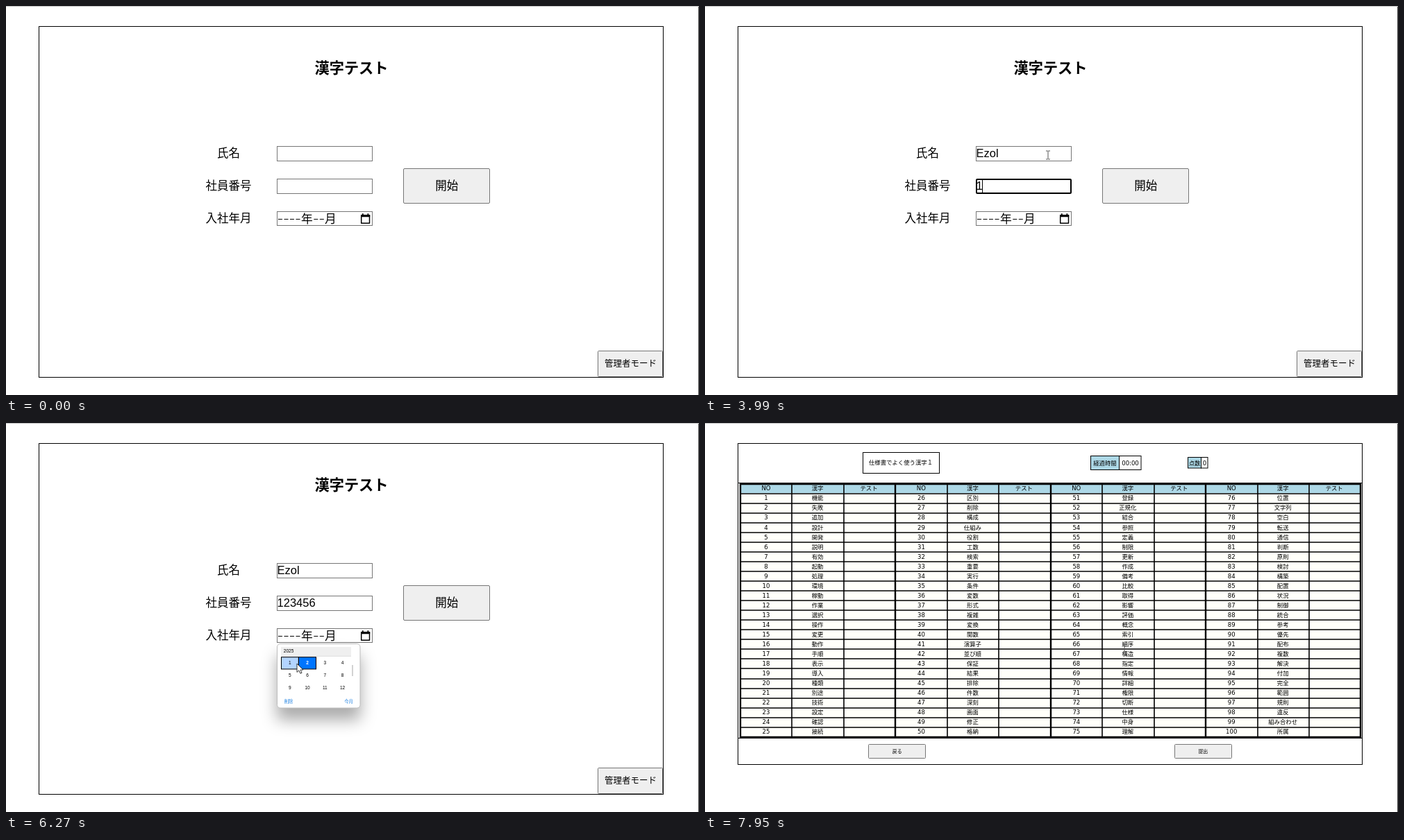
An HTML page for the animation above (8 s loop, 998 px wide and 561 px high).

```html
<!DOCTYPE html>
<html lang="ja">
<head>
<meta charset="utf-8">
<title>漢字テスト</title>
<style>
html, body { margin: 0; width: 100%; height: 100%; overflow: hidden; background: #fff; }
svg { display: block; width: 998px; height: 561px; font: 16.5px "Noto Sans CJK JP", "Noto Sans CJK", sans-serif; }
.mid { text-anchor: middle; }
.typed { font-family: "Liberation Sans", Arial, sans-serif; }
.half { font: 16.8px "Noto Sans Mono CJK JP", "Noto Sans Mono", monospace; }
.num { font: 8.5px "DejaVu Sans", sans-serif; }
.small { font-size: 8.4px; }
.tiny { font: 6.5px "Liberation Sans", Arial, sans-serif; }
.line { fill: none; stroke: #000; }
.field { fill: #fff; stroke: #767676; }
.field.on { stroke: #000; stroke-width: 2; }
.button { fill: #efefef; stroke: #767676; }
.button.hover { fill: #e5e5e5; stroke: #4f4f4f; }
.head { fill: #add8e6; stroke: #000; }
.link { font-size: 6.3px; fill: #1a7fe0; }
#panel { filter: drop-shadow(0 17px 11px rgba(0, 0, 0, .33)); }
</style>
</head>
<body>
<svg viewBox="0 0 998 561">
  <path d="M0 .5H998" stroke="#c4c4c4"/>
  <path d="M997.5 1V561" stroke="#444"/>

  <g id="form">
    <rect class="line" x="47.5" y="29.5" width="899" height="506"/>
    <text class="mid" x="497.5" y="96.5" font-size="21.2" font-weight="700">漢字テスト</text>
    <g class="mid">
      <text x="320.5" y="218">氏名</text>
      <text x="320.5" y="265">社員番号</text>
      <text x="320.5" y="312">入社年月</text>
    </g>
    <rect class="field" id="nameBox"/>
    <rect class="field" id="codeBox"/>
    <rect class="field" x="390.5" y="296.5" width="137" height="20"/>
    <text class="typed" id="name" x="390.6" y="218.3"></text>
    <text class="typed" id="code" x="390.6" y="265.3"></text>
    <rect id="caret" width="1" height="18"/>
    <g class="half">
      <text x="425" y="313">年</text>
      <text x="459" y="313">月</text>
      <path id="blank" class="line" stroke-width="1.1" stroke-dasharray="6 2.5" d="M392 307.5h32M443.3 307.5h15"/>
      <g id="date"><text x="391" y="313">2025</text><text x="442" y="313">02</text></g>
    </g>
    <path d="M511.7 301.7h11.8v11.6h-11.8z" class="line" stroke-width="1.5" stroke-linejoin="round"/>
    <path d="M511 301h13.2v3.2h-13.2zM513 299.2h1.7v2.5h-1.7zM520.5 299.2h1.7v2.5h-1.7z"/>
    <rect class="button" id="start" x="572.5" y="234.5" width="124" height="50" rx="1.5"/>
    <text class="mid" x="634.7" y="265">開始</text>
    <rect class="button" x="852.5" y="497.5" width="93" height="37" rx="1"/>
    <text class="mid" x="899.5" y="520" font-size="12.5">管理者モード</text>
  </g>

  <g id="popup">
    <rect id="panel" x="390.5" y="318.5" width="119.5" height="92.5" rx="4.5" fill="#fff" stroke="#bdbdbd"/>
    <rect x="396" y="323" width="101" height="13" fill="#efefef"/>
    <path d="M396 336.3H497" stroke="#d5d5d5" stroke-width=".8"/>
    <text class="tiny" x="399.8" y="331.3">2025</text>
    <rect id="jan" x="396.5" y="337.7" width="24.8" height="17.2" fill="#b3d4ff" stroke="#000"/>
    <rect x="421.5" y="337.7" width="25" height="17.2" fill="#0075ff" stroke="#000"/>
    <g class="tiny mid" id="months"></g>
    <path d="M499 349V365" stroke="#c1c1c1" stroke-width="1.4"/>
    <text class="link" x="400.8" y="404.3">削除</text>
    <text class="link" x="487.2" y="404.3">今月</text>
  </g>

  <g id="sheet">
    <rect class="line" x="47.5" y="29.5" width="899" height="463"/>
    <path class="line" d="M47 86.5H947M47 454.5H947"/>
    <rect class="line" x="227.5" y="42.5" width="110" height="30"/>
    <text class="small mid" x="282" y="60.3">仕様書でよく使う漢字１</text>
    <rect class="head" x="555.5" y="47.5" width="41" height="20"/>
    <rect class="line" x="596.5" y="47.5" width="31.5" height="20"/>
    <text class="small mid" x="576" y="60.5">経過時間</text>
    <text class="num mid" x="612.5" y="60.5">00:00</text>
    <rect class="head" x="695.5" y="49.5" width="19" height="15.5"/>
    <rect class="line" x="714.5" y="49.5" width="9.5" height="15.5"/>
    <text class="small mid" x="705" y="60.5">点数</text>
    <text class="num mid" x="719.5" y="60.5">0</text>
    <g id="table"></g>
    <rect class="button" x="235.5" y="463.5" width="82" height="20" rx="1"/>
    <rect class="button" x="676.5" y="463.5" width="82" height="20" rx="1"/>
    <g class="mid" font-size="6.9">
      <text x="276.7" y="475.8">戻る</text>
      <text x="717.3" y="475.8">提出</text>
    </g>
  </g>

  <g id="pointer">
    <circle id="press" cx="-1" cy="1" r="9" fill="#ff0" fill-opacity=".55"/>
    <path id="arrow" d="M0 0V12.4L2.9 9.8L4.9 14.2L7 13.3L5.1 9H9Z" fill="#fff" stroke="#222" stroke-width=".9"/>
    <path id="beam" d="M-3-6H-.7L0-5.4L.7-6H3M0-5.4V5.4M-3 6H-.7L0 5.4L.7 6H3" fill="none" stroke="#555"/>
  </g>
</svg>
<script>
const $ = id => document.getElementById(id);
const show = (id, on) => { $(id).style.display = on ? '' : 'none'; };

const words = `機能 失敗 追加 設計 開発 説明 有効 起動 処理 環境 稼動 作業 選択 操作 変更 動作 手順 表示 導入 種類 別途 技術 設定 確認 接続
区別 削除 構成 仕組み 役割 工数 検索 重要 実行 条件 変数 形式 複雑 変換 関数 演算子 並び順 保証 結果 排除 件数 深刻 画面 修正 格納
登録 正規化 結合 参照 定義 制限 更新 作成 備考 比較 取得 影響 評価 概念 索引 順序 構造 指定 情報 詳細 権限 切断 仕様 中身 理解
位置 文字列 空白 転送 通信 判断 原則 検討 構築 配置 状況 制御 統合 参考 優先 配布 複数 解決 付加 完全 範囲 規則 違反 組み合わせ 所属`.split(/\s+/);

const label = (cls, x, y, s) => `<text class="${cls} mid" x="${x}" y="${y}">${s}</text>`;

function buildTable() {
  const block = 223.4, col = 74.4, row = 14.04, top = 101.75;
  let out = '<path fill="#fffffa" d="M50 88H944V453H50z"/><path fill="#add8e6" d="M50 88H944V101H50z"/>';
  let thin = '', thick = 'M50 88H944.5M50 453H944.5';
  for (let r = 0; r < 25; r++) thin += `M50 ${Math.round(top + r * row)}H944`;
  for (let b = 0; b < 4; b++) {
    const x = 51 + b * block;
    thick += `M${Math.round(x)} 87V454`;
    thin += `M${Math.round(x + col)} 88V453M${Math.round(x + 2 * col)} 88V453`;
    out += label('num', x + 37, 97.3, 'NO') + label('small', x + 111, 97.3, '漢字') + label('small', x + 185, 97.3, 'テスト');
    for (let r = 0; r < 25; r++) {
      const n = b * 25 + r, y = 111.4 + r * row;
      out += label('num', x + 37, y, n + 1) + label('small', x + 111, y, words[n]);
    }
  }
  thick += 'M944 87V454';
  $('table').innerHTML = out +
    `<path class="line" stroke-width="1.6" d="${thin}"/><path class="line" stroke-width="2.4" d="${thick}"/>`;
}

function buildMonths() {
  let out = '';
  for (let m = 0; m < 12; m++) {
    const now = m === 1 ? ' fill="#fff" font-weight="700"' : '';
    out += `<text x="${408.7 + m % 4 * 25.3}" y="${348.2 + (m >> 2) * 18}"${now}>${m + 1}</text>`;
  }
  $('months').innerHTML = out;
}

// start, end, steps, from x, y, to x, y
const moves = [
  [450, 860, 7, 959, 548, 452, 174],
  [1080, 1270, 4, 460, 181, 494, 215],
  [4990, 5450, 8, 495, 219, 521, 306],
  [5650, 5720, 2, 515, 322, 496, 336],
  [5790, 6120, 6, 482, 345, 428, 362],
  [6190, 6270, 2, 424, 355, 419, 347],
  [6350, 6540, 4, 421, 348, 432, 351],
  [6930, 7420, 8, 445, 347, 659, 252],
  [7620, 7690, 2, 622, 290, 592, 316],
  [7750, 7950, 3, 588, 332, 604, 325]
];
const presses = [[1270, 1400], [5520, 5650], [7490, 7620]];
const keys = {
  name: ['Ezol', [2060, 2740, 2920, 3080]],
  code: ['123456', [3990, 4060, 4130, 4390, 4650, 4920]]
};
const within = (t, a, b) => t >= a && t < b;

function pointerAt(t) {
  const m = moves.filter(s => t >= s[0]).pop();
  if (!m) return [-50, -50];
  const [a, b, n, x0, y0, x1, y1] = m;
  const k = Math.min(n - 1, Math.floor((t - a) / (b - a) * (n - 1) + .02)) / (n - 1);
  const e = k * k * (3 - 2 * k);
  return [x0 + (x1 - x0) * e, y0 + (y1 - y0) * e];
}

function setField(id, y, on) {
  const box = $(id), d = on ? 1 : .5;
  box.setAttribute('class', on ? 'field on' : 'field');
  const size = { x: 390 + d, y: y + d, width: 138 - 2 * d, height: 22 - 2 * d, rx: on ? 1 : 0 };
  for (const k in size) box.setAttribute(k, size[k]);
}

function type(id, t) {
  const [text, times] = keys[id];
  $(id).textContent = text.slice(0, times.filter(k => t >= k).length);
}

function draw(t) {
  const onSheet = t >= 7620;
  const onName = within(t, 1270, 3400), onCode = within(t, 3400, 5520);
  const open = within(t, 5650, 6670), [x, y] = pointerAt(t);
  show('form', !onSheet);
  show('sheet', onSheet);
  show('popup', open);
  show('date', t >= 6670);
  show('blank', t < 6670);
  show('jan', x < 421);

  setField('nameBox', 202, onName);
  setField('codeBox', 249, onCode);
  type('name', t);
  type('code', t);
  const active = $(onName ? 'name' : 'code');
  const filled = active.textContent.length > 0;
  show('caret', filled && (onName || onCode) && !within(t, 2590, 2740));
  if (filled && !onSheet) {
    $('caret').setAttribute('x', Math.floor(390.6 + active.getComputedTextLength()));
    $('caret').setAttribute('y', onName ? 204 : 251);
  }

  const overField = x > 390 && x < 528 && (within(y, 202, 224) || within(y, 249, 271));
  const beam = onSheet ? t >= 7750 : overField;
  show('beam', beam);
  show('arrow', !beam);
  show('press', presses.some(p => within(t, ...p)));
  $('pointer').setAttribute('transform', `translate(${Math.round(x)} ${Math.round(y)})`);
  $('start').classList.toggle('hover', within(x, 572, 697) && within(y, 234, 285));
}

buildTable();
buildMonths();
const begin = performance.now();
function tick() {
  draw((performance.now() - begin) % 8000);
  requestAnimationFrame(tick);
}
tick();
</script>
</body>
</html>
```
